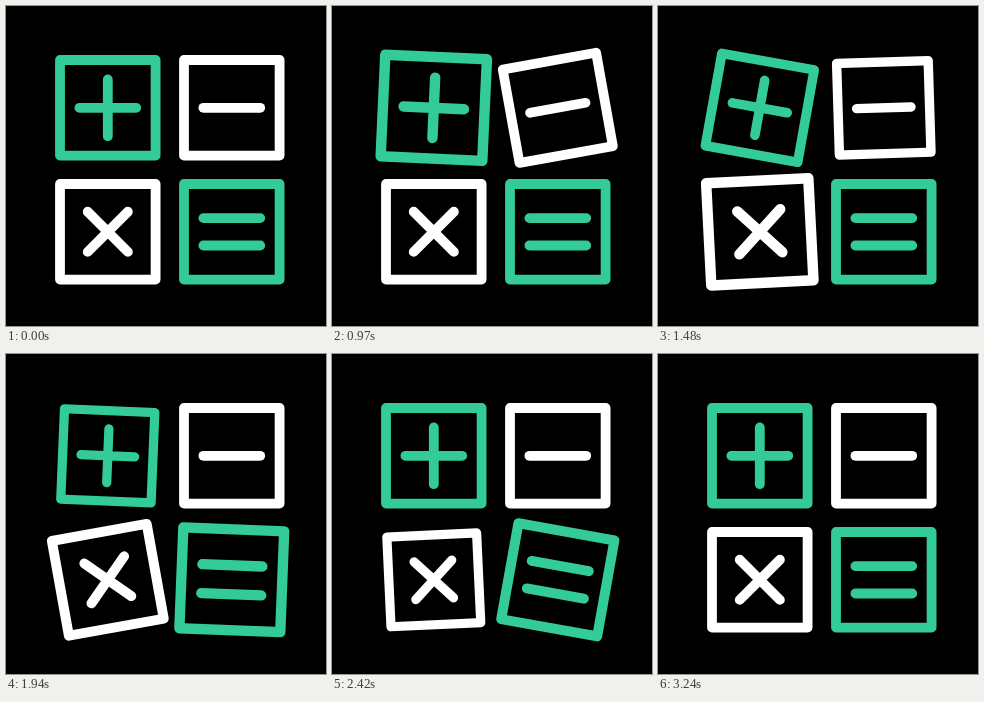
An HTML page with a canvas for the animation above (3.27 s loop, 320 by 320 pixels).

```html
<!DOCTYPE html>
<html lang="en">
<head>
<meta charset="utf-8">
<title>Calculator keys</title>
<style>
html, body { margin: 0; width: 100%; height: 100%; overflow: hidden; background: #000; }
canvas { display: block; width: 100vw; height: 100vh; object-fit: contain; }
</style>
</head>
<body>
<canvas id="stage" width="320" height="320"></canvas>
<script>
const LOOP = 3270, DELAY = 240, STAGGER = 495, WOBBLE = 1430;
const NEAR = 101.8, FAR = 225.8, HALF = 47.8, BAR = 28.4, GAP = 13.7;
const GREEN = '#33cc99', WHITE = '#fff';
const SIZES = [1, 1.13, 0.88, 1];
const MAX_TILT = 10.2;

const ctx = document.getElementById('stage').getContext('2d');
const ease = u => u * u * (3 - 2 * u);
const radians = degrees => degrees * Math.PI / 180;

// One bar through the centre, turned by an angle and shifted down.
function bar(degrees = 0, y = 0) {
  const dx = BAR * Math.cos(radians(degrees));
  const dy = BAR * Math.sin(radians(degrees));
  ctx.moveTo(-dx, y - dy);
  ctx.lineTo(dx, y + dy);
}

// Listed in the order they wobble.
const keys = [
  { x: FAR, y: NEAR, color: WHITE, sign() { bar(); } },
  { x: NEAR, y: NEAR, color: GREEN, sign() { bar(); bar(90); } },
  { x: NEAR, y: FAR, color: WHITE, sign() { bar(45); bar(-45); } },
  { x: FAR, y: FAR, color: GREEN, sign() { bar(0, -GAP); bar(0, GAP); } }
];

// Grow, shrink and settle in equal steps; u runs from 0 to 1.
function sizeAt(u) {
  const step = Math.min(Math.floor(u * 3), 2);
  const from = SIZES[step], to = SIZES[step + 1];
  return from + (to - from) * ease(u * 3 - step);
}

// Lean over and back again.
const tiltAt = u => MAX_TILT * ease(1 - Math.abs(2 * u - 1));

function drawKey(key, t) {
  const u = Math.min(Math.max(t / WOBBLE, 0), 1);
  const size = sizeAt(u);
  const side = key.color === GREEN ? 1 : -1;
  ctx.save();
  ctx.translate(key.x, key.y);
  ctx.rotate(side * radians(tiltAt(u)));
  ctx.scale(size, size);
  ctx.strokeStyle = key.color;
  ctx.lineWidth = 9.8;
  ctx.lineCap = ctx.lineJoin = 'round';
  ctx.strokeRect(-HALF, -HALF, 2 * HALF, 2 * HALF);
  ctx.beginPath();
  key.sign();
  ctx.stroke();
  ctx.restore();
}

function draw(t) {
  ctx.fillStyle = '#000';
  ctx.fillRect(0, 0, 320, 320);
  keys.forEach((key, i) => drawKey(key, t - DELAY - i * STAGGER));
}

const start = performance.now();
function tick() {
  draw((performance.now() - start) % LOOP);
  requestAnimationFrame(tick);
}
tick();
</script>
</body>
</html>
```
